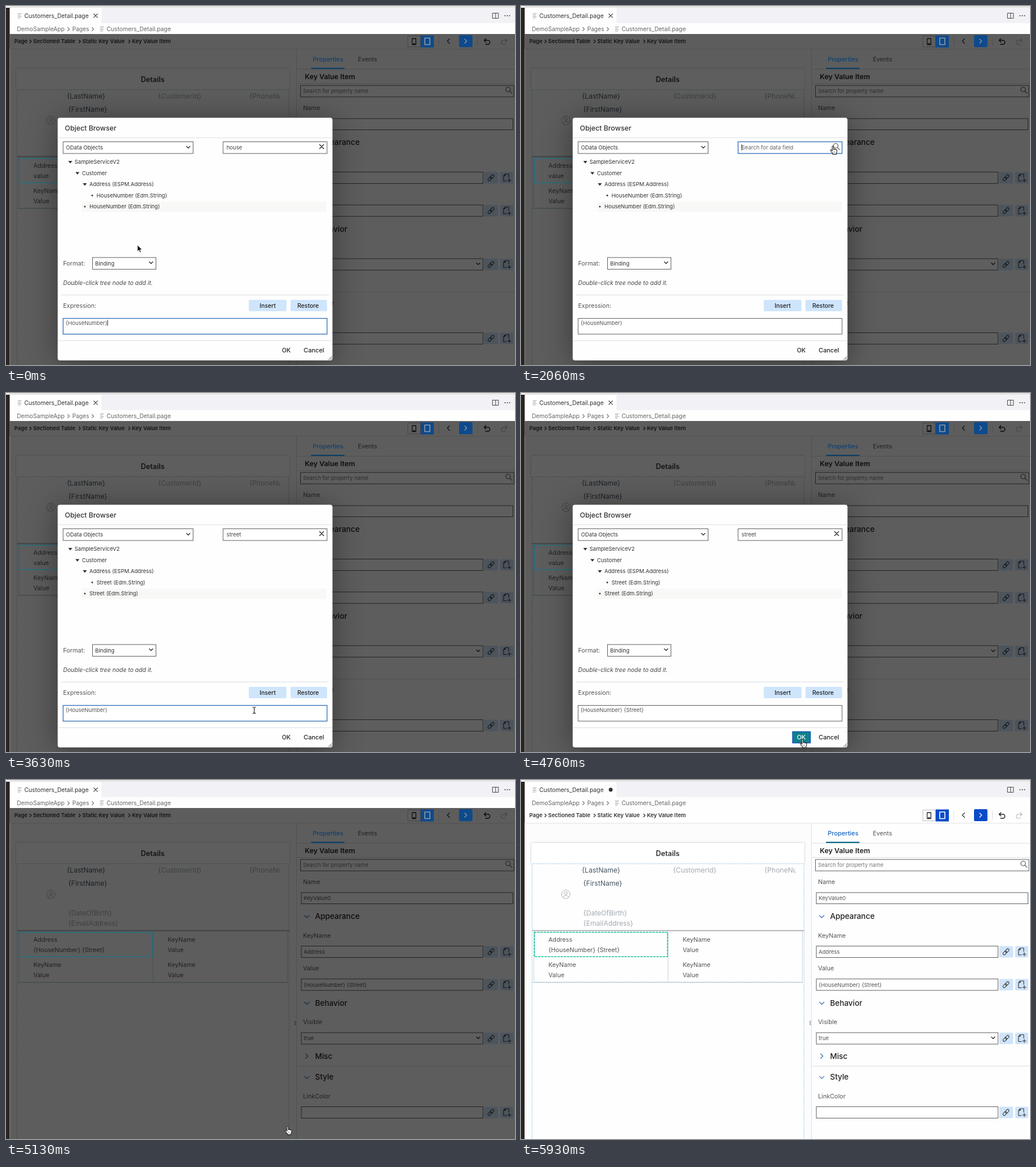
An HTML page for the animation above (6200 ms loop, 891 by 628 pixels).

```html
<!DOCTYPE html>
<html lang="en">
<head>
<meta charset="utf-8">
<title>Object Browser</title>
<style>
html, body { margin: 0; width: 100%; height: 100%; overflow: hidden; background: #fff; }
svg { display: block; width: 891px; height: 628px; font-family: Inter, "Open Sans", sans-serif; }
text { white-space: pre; }
.line { fill: none; stroke: #333; stroke-linecap: round; stroke-linejoin: round; }
.accent { --blue: #0a4bc9; --tab: #1766c0; --bar: #0d6c86; --mark: #19c39a; --on: #fff; }
.accent.dimmed { --blue: #0e4a8c; --tab: #12406d; --bar: #0c4065; --mark: #16768a; --on: #8f9aa5; }
.field { fill: #fff; stroke: #5c5f62; }
.field.focus { stroke: #2f6db5; stroke-width: 1.3; }
.halo { filter: drop-shadow(0 4px 26px rgba(0, 0, 0, .4)); }
</style>
</head>
<body>
<svg id="stage" viewBox="0 0 891 628"></svg>
<script>
const LOOP = 6200;

const text = (x, y, str, size = 9.47, fill = '#333', extra = '') =>
  `<text x="${x}" y="${y}" font-size="${size}" fill="${fill}" ${extra}>${str}</text>`;
const rect = (x, y, w, h, fill, extra = '') =>
  `<rect x="${x}" y="${y}" width="${w}" height="${h}" fill="${fill}" ${extra}/>`;
const line = (d, stroke = '#333', width = 1, extra = '') =>
  `<path class="line" d="${d}" style="stroke:${stroke};stroke-width:${width}" ${extra}/>`;
const field = (x, y, w, h, id = '') =>
  `<rect class="field" ${id && `id="${id}"`} x="${x}" y="${y}" width="${w}" height="${h}"/>`;
const at = (x, y, body, extra = '') => `<g transform="translate(${x} ${y})" ${extra}>${body}</g>`;
const group = (id, body) => `<g id="${id}">${body}</g>`;

const BOLD = 'font-weight="700"', SEMI = 'font-weight="600"', MEDIUM = 'font-weight="500"';
const down = (x, y, c = '#333', s = 3, w = 1.4) => line(`M${x - s} ${y - s / 2}l${s} ${s}l${s} ${-s}`, c, w);
const right = (x, y, c = '#333', s = 3, w = 1.1) => line(`M${x - s / 2} ${y - s}l${s} ${s}l${-s} ${s}`, c, w);
const cross = (x, y, s, w) => line(`M${x - s} ${y - s}l${2 * s} ${2 * s}m0 ${-2 * s}l${-2 * s} ${2 * s}`, '#333', w);
const lens = (x, y) => line(`M${x + 2.8} ${y + 2.8}l4 4M${x + 4} ${y}a4 4 0 1 1-8 0a4 4 0 1 1 8 0`, '#555', 1.2);
const fileIcon = (x, y) => line(`M${x} ${y}h6m-6 2.5h4.5m-4.5 2.5h6m-6 2.5h4`, '#9a9da2', .9);

function valueButtons(y) {
  const chain = at(849, y + 10,
    '<g transform="rotate(-45)"><rect class="line" x="-6.5" y="-2.2" width="7.5" height="4.4" rx="2.2"/>' +
    '<rect class="line" x="-1" y="-2.2" width="7.5" height="4.4" rx="2.2"/></g>');
  return rect(837, y, 24.5, 20, '#cfe4fa', 'rx="2"') + rect(865, y, 23, 20, '#cfe4fa', 'rx="2"') + chain +
    line(`M876 ${y + 15.5}h-5v-9l3-3h6v6m-6-6v3h-3m10 5v6m-3-3h6`, '#333', 1.1);
}

function shell() {
  return rect(0, 0, 891, 628, '#fefefe') + rect(6, 0, 885, 30, '#f2f2f6') + rect(6, 0, 885, 3, '#e5e4e3') +
    rect(6, 3, 161, 28, '#fefefe') + rect(0, 3, 6.5, 625, '#2b2522') +
    fileIcon(21, 13.5) + text(32, 21, 'Customers_Detail.page', 10.27) +
    group('closeTab', cross(157, 17, 3.2, 1.2)) +
    group('unsaved', '<circle cx="157" cy="17" r="3.4" fill="#333"/>') +
    line('M852 12.5h10v9h-10zM857 12.5v9', '#444') +
    [873.5, 877.5, 881.5].map(x => `<circle cx="${x}" cy="17" r="1" fill="#444"/>`).join('') +
    text(19, 44, 'DemoSampleApp', 10.23, '#666') + right(109.5, 40.5, '#777') +
    text(116, 44, 'Pages', 10.1, '#666') + right(152, 40.5, '#777') +
    fileIcon(165, 36.5) + text(176, 44, 'Customers_Detail.page', 10.27, '#666');
}

function toolbar() {
  const crumbs = [[14.5, 'Page'], [47.5, 'Sectioned Table'], [133.5, 'Static Key Value'], [220.5, 'Key Value Item']];
  return crumbs.map(([x, s]) => text(x, 65.3, s, 9.5, '#333', SEMI)).join('') +
    [43, 129, 216].map(x => right(x, 62, '#333', 2.5, 1.3)).join('') +
    line('M6.5 75.5H891', '#e3e3e5') +
    rect(703.5, 52.5, 22, 19, '#fff', 'stroke="#b9bcc0"') +
    line('M711 57h6.5v10.5h-6.5zM713 66h2.5', '#222', 1.3) +
    line('M757.5 54v16M825.5 54v16', '#e0e0e2') + line('M776.5 57.5l-4 4l4 4', '#333', 1.3) +
    line('M840 57l-3 3l3 3M837 60h6.5a3.4 3.4 0 0 1 0 7h-4', '#222', 1.5) +
    line('M874 57l3 3l-3 3M877 60h-6.5a3.4 3.4 0 0 0 0 7h4', '#b5b7ba', 1.2);
}

function canvas() {
  const cells = [[48, 327, 'KeyName'], [48, 344.5, 'Value'], [283, 283, 'KeyName'], [283, 300.5, 'Value'],
    [283, 327, 'KeyName'], [283, 344.5, 'Value'], [48, 283, 'Address']];
  return rect(6.5, 76, 502, 552, '#fcfcfd') +
    rect(18, 110, 478, 36, '#fff', 'style="filter:drop-shadow(0 0 1.5px #bbb)"') +
    text(236, 132.7, 'Details', 12.55, '#333', SEMI) + rect(19, 146, 476, 482, '#fefefe') +
    line('M19.5 628V146.5H495.5V628M19 354.5H495', '#a9cfe2', 1, 'stroke-dasharray="2 2"') +
    text(106.5, 162, '{LastName}', 12, '#475563') + text(109, 184.7, '{FirstName}', 12, '#475563') +
    text(266, 162, '{CustomerId}', 12, '#a3aab2') +
    '<clipPath id="edge"><path d="M400 140h81v30h-81z"/></clipPath>' +
    text(426, 162, '{PhoneNu', 12, '#a3aab2', 'clip-path="url(#edge)"') +
    text(109, 236.5, '{DateOfBirth}', 12, '#a3aab2') + text(109, 255, '{EmailAddress}', 12, '#a3aab2') +
    line('M86 200a7.5 7.5 0 1 1-15 0a7.5 7.5 0 1 1 15 0M81 198a2.5 2.5 0 1 1-5 0a2.5 2.5 0 1 1 5 0M74 205.5c1-5 8-5 9 0', '#a3aab2', .9) +
    line('M20 263.5H495', '#b3b6ba', 2) +
    line('M22.5 265V353.5H492.5V265M257.5 265V353', '#cfd2d6') +
    cells.map(([x, y, s]) => text(x, y, s, 10.7, '#555')).join('') +
    '<text id="itemValue" x="48" y="300.5" font-size="10.7" fill="#555"></text>';
}

function properties() {
  const label = (y, s) => text(520, y, s, 10.7, '#555');
  const section = (y, s, open = true) =>
    (open ? down(526.5, y - 4, '#2f6db5', 4, 1.1) : right(526.5, y - 5, '#2f6db5', 4)) +
    text(541, y, s, 13.4, '#222', MEDIUM);
  const row = y => field(517, y, 318, 20) + valueButtons(y);
  return rect(509, 76, 382, 552, '#fefefe') + line('M508.5 76V628', '#dcdde0') +
    rect(505, 421, 2.5, 8, '#b8bac0') +
    text(616, 97, 'Events', 10.6, '#555') + line('M510 110.5H891M510 135.5H891', '#dcdde0') +
    text(523, 128, 'Key Value Item', 12.3, '#222', SEMI) +
    field(515.5, 139, 373.5, 20) + text(520, 152.4, 'Search for property name', 9.41, '#777') + lens(879, 146) +
    label(181.7, 'Name') + field(517, 197, 370.5, 19.5) + text(521, 210.3, 'KeyValue0', 9.47, '#555') +
    section(243, 'Appearance') + label(275.5, 'KeyName') + row(290.5) + text(521, 304, 'Address', 9.47, '#555') +
    label(333, 'Value') + row(348) + '<text id="boundValue" x="521" y="361.5" font-size="9.47" fill="#555"></text>' +
    section(394.5, 'Behavior') + label(427, 'Visible') + row(442) + text(521, 455.3, 'true', 9.47, '#555') +
    down(826.5, 451) + section(488, 'Misc', false) + line('M510 500.5H891', '#dcdde0') +
    section(524.3, 'Style') + label(556.5, 'LinkColor') + row(571.5);
}

// Blue parts keep their hue under the modal layer, so they sit above it.
function accents() {
  return `<g id="accents" class="accent">` +
    rect(726, 51.5, 23, 21, 'var(--blue)') +
    line('M733 56h9v11.5h-9z', 'var(--on)', 1.6) +
    rect(793, 51, 23.5, 21, 'var(--blue)', 'rx="2"') + line('M803 58l3.5 3.5l-3.5 3.5', 'var(--on)', 1.3) +
    text(537, 97, 'Properties', 10.83, 'var(--tab)', MEDIUM) + rect(534, 108, 58.5, 2.2, 'var(--bar)') +
    line('M23.5 266.5H256.5V309H23.5z', 'var(--mark)', 1.7, 'stroke-dasharray="3 2.6" stroke-linecap="butt"') + '</g>';
}

function dialog() {
  const node = (x, y) => `<path d="M${x} ${y - 2}h7l-3.5 4.4z" fill="#333"/>`;
  const bullet = (x, y) => `<circle cx="${x}" cy="${y}" r="1.4" fill="#333"/>`;
  return group('dialog',
    rect(90.5, 195.5, 481, 424.5, '#fefefe', 'rx="4" class="halo"') +
    text(103, 217.5, 'Object Browser', 12.26, '#333', MEDIUM) + line('M91 230.5H571', '#e0e0e2') +
    field(100, 237.5, 227.5, 20.5) + text(105, 251, 'OData Objects') + down(319, 247) +
    field(380, 237.5, 182, 20.5, 'searchBox') +
    '<text id="search" x="386" y="250.5" font-size="9.47"></text>' +
    rect(0, 242, 1, 10.5, '#222', 'id="searchCaret"') +
    group('clear', cross(552.5, 246, 3.5, 1.5)) + group('lens', lens(551, 244.5)) +
    rect(133, 342.5, 428, 17.5, '#f8f8f6', 'id="selected"') +
    node(109, 273) + text(120, 276.3, 'SampleServiceV2') +
    node(121.5, 292.5) + text(133, 295.8, 'Customer') +
    node(134.5, 312) + text(146, 315.3, 'Address (ESPM.Address)') +
    bullet(151, 331.5) + bullet(138, 351) +
    '<text class="leaf" x="158.5" y="334.8" font-size="9.47" fill="#333"></text>' +
    '<text class="leaf" x="146" y="354.2" font-size="9.47" fill="#333"></text>' +
    text(100, 453.8, 'Format:', 10.65, '#555') + field(151.5, 440, 111, 20.5) + text(156, 453.5, 'Binding', 9.55) +
    down(254, 449) +
    text(100, 487.5, 'Double-click tree node to add it.', 10.3, '#444', 'font-style="italic"') +
    line('M97 505.5H565', '#dcdde0') + text(100, 528.3, 'Expression:', 10.6, '#555') +
    rect(425, 514, 66, 20, '#cfe5fc', 'id="insert" rx="2"') + rect(498, 514, 64, 20, '#cfe5fc', 'rx="2"') +
    text(444, 528, 'Insert', 10.3, '#222', MEDIUM) + text(510, 528, 'Restore', 10.3, '#222', MEDIUM) +
    field(100, 546.5, 462, 27.5, 'exprBox') +
    '<text id="expr" x="104.5" y="558" font-size="9.47" fill="#555"></text>' +
    rect(0, 549, 1, 10.5, '#222', 'id="exprCaret"') +
    line('M91 585.5H571', '#e0e0e2') +
    rect(475.5, 592.5, 31, 19.5, '#0f828c', 'id="okFill" stroke="#1658b8" stroke-width="1.6"') +
    text(483, 606, 'OK', 10.6, '#222', `${MEDIUM} id="ok"`) + text(521, 606, 'Cancel', 10.75, '#222', MEDIUM) +
    line('M564.5 619l6-6M567.5 619l3-3', '#555'));
}

function pointer() {
  const hand = 'M-1.2 1c0-1.6 2.3-1.6 2.3 0v4.6c.4-.7 2-.6 2.1.3c.6-.6 1.9-.4 2 .5c.7-.4 1.9 0 1.9 1.1' +
    'c0 3-.6 4-1.2 5v1.9H-.3v-1.5C-2 11-3.6 9-4 7.8c-.3-1.2 1-1.7 1.8-.8l1 1z';
  return '<g id="pointer">' +
    '<path id="arrow" d="M0 0V11.6L2.7 9.1l1.9 4.3 2-.9-1.9-4.1h3.8z" fill="#111" stroke="#fff" stroke-width=".9"/>' +
    `<g id="hand"><path d="${hand}" fill="#fff" stroke="#222" stroke-width="1.1"/>` +
    line('M1.2 9.5v2.5M3.2 9.5v2.5', '#555', .6) + '</g>' +
    group('beam', line('M-2.5-5.5q2 0 2.5 1.2q.5-1.2 2.5-1.2M0-4.5V4.5M-2.5 5.5q2 0 2.5-1.2q.5 1.2 2.5 1.2', '#222', 1.2)) +
    '</g>';
}

document.getElementById('stage').innerHTML = shell() + toolbar() + canvas() + properties() +
  rect(6.5, 49, 884.5, 579, '#000', 'id="dim" opacity=".63"') + accents() + dialog() + pointer();

const $ = id => document.getElementById(id);
const leaves = document.querySelectorAll('.leaf');
const show = (id, on) => $(id).style.display = on ? '' : 'none';
const within = (t, a, b) => t >= a && t < b;
const put = (el, str) => { if (el.textContent !== str) el.textContent = str; };

// Pointer stops: [time, x, y]
const path = [[0, 230, 418], [930, 230, 418], [1500, 546, 245], [2400, 546, 245], [2800, 218, 370],
  [3030, 205, 350], [3360, 205, 350], [3600, 434.5, 555], [3680, 434.5, 555], [3860, 458, 524],
  [4400, 458, 524], [4680, 493, 606], [LOOP, 493, 606]];
const keyTimes = [2130, 2200, 2330, 2460, 2530, 2600];

function pointerAt(t) {
  const i = path.findIndex(p => p[0] > t), [t0, x0, y0] = path[i - 1], [t1, x1, y1] = path[i];
  const p = (t - t0) / (t1 - t0), k = p * p * (3 - 2 * p);
  return [x0 + (x1 - x0) * k, y0 + (y1 - y0) * k];
}

function placeCaret(id, label, on, gap = 0) {
  show(id, on);
  if (on) $(id).setAttribute('x', +label.getAttribute('x') + label.getComputedTextLength() + gap);
}

function render(t) {
  const open = t < 5000, dimmed = t < 5230, cleared = t >= 1830;
  const typed = 'street'.slice(0, keyTimes.filter(k => t >= k).length);
  const empty = cleared && !typed, search = $('search');

  show('dialog', open);
  show('dim', dimmed);
  $('accents').classList.toggle('dimmed', dimmed);
  show('closeTab', dimmed);
  show('unsaved', !dimmed);
  put($('itemValue'), open ? 'value' : '{HouseNumber} {Street}');
  put($('boundValue'), open ? 'value' : '{HouseNumber} {Street}');

  put(search, empty ? 'Search for data field' : cleared ? typed : 'house');
  search.setAttribute('fill', empty ? '#666' : '#444');
  $('searchBox').classList.toggle('focus', within(t, 1830, 2530));
  placeCaret('searchCaret', search, within(t, 1830, 3030));
  if (empty) $('searchCaret').setAttribute('x', 386);
  show('clear', !empty);
  show('lens', empty);

  const leaf = t < 2660 ? 'HouseNumber (Edm.String)' : 'Street (Edm.String)';
  leaves.forEach(el => put(el, leaf));
  show('selected', t < 2660 || t >= 3300);

  const expr = $('expr'), spaced = t >= 3700;
  put(expr, t >= 4000 ? '{HouseNumber} {Street}' : '{HouseNumber}');
  $('exprBox').classList.toggle('focus', t < 1560 || within(t, 3560, 3930));
  const caret = within(t, 0, 260) || within(t, 760, 1260) || within(t, 3700, 3930);
  placeCaret('exprCaret', expr, caret, spaced ? 2.6 : 0);
  $('insert').setAttribute('fill', within(t, 3930, 4060) ? '#a9d0f7' : '#cfe5fc');

  const pressed = t >= 4690;
  show('okFill', pressed);
  $('ok').setAttribute('fill', pressed ? '#fff' : '#222');

  const [x, y] = pointerAt(t);
  const hand = within(t, 1460, 2440) || within(t, 3800, 4450) || t >= 4640;
  const beam = within(t, 3580, 3730);
  $('pointer').setAttribute('transform', `translate(${x.toFixed(1)} ${y.toFixed(1)})`);
  show('pointer', t < 5530);
  show('hand', hand);
  show('beam', beam);
  show('arrow', !hand && !beam);
}

let start;
function tick(now) {
  start ??= now;
  render((now - start) % LOOP);
  requestAnimationFrame(tick);
}
render(0);
requestAnimationFrame(tick);
</script>
</body>
</html>
```
